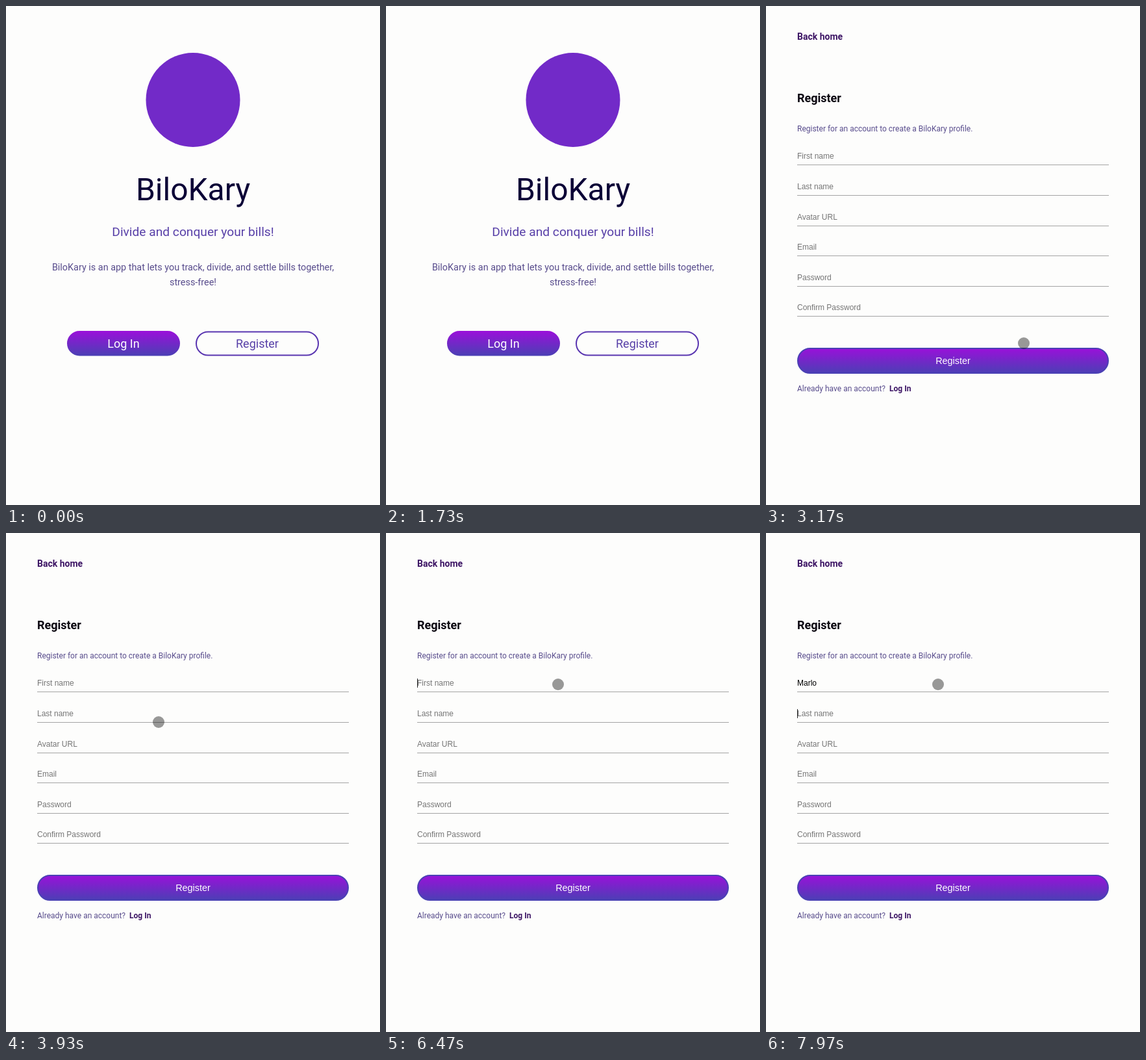
Write an HTML page with a canvas that moves like this. It is 576 px wide and 768 px high and loops after 8 s.

```html
<!DOCTYPE html>
<html lang="en">
<head>
<meta charset="utf-8">
<title>Bill splitting app</title>
<style>
  html, body { margin: 0; width: 100%; height: 100%; overflow: hidden; background: #fdfdfc; }
  canvas { display: block; width: 576px; height: 768px; }
</style>
</head>
<body>
<canvas id="stage"></canvas>
<script>
const W = 576, H = 768, LOOP = 8000;
const BRAND = 'BiloKary';
const FIRST_NAME = 'Marlo';
const ROBOTO = 'Roboto, sans-serif';
const ARIAL = '"Liberation Sans", Arial, sans-serif';
const FIELDS = ['First name', 'Last name', 'Avatar URL', 'Email', 'Password', 'Confirm Password'];

const color = {
  page: '#fdfdfc', title: '#0a0036', violet: '#5840a8', body: '#584c8c',
  link: '#3c1464', hint: '#757575', rule: '#a4a4a4', logo: '#722ac8',
  indigo: '#4a40b4', purple: '#9b10da', border: '#5834b0', pointer: '#999999'
};

const SWITCH = 2800, FOCUS = 5100, TYPE = 6730, KEY_GAP = 150, TAB = 7700;

// Pointer stops: time, x, y
const stops = [
  [1900, 500, 430], [2250, 397, 519], [3400, 397, 519], [3930, 235, 291],
  [4650, 103, 229], [5500, 103, 229], [6100, 265, 233], [LOOP, 265, 233]
];

const canvas = document.getElementById('stage');
const ctx = canvas.getContext('2d', { alpha: false });
const dpr = window.devicePixelRatio || 1;
canvas.width = W * dpr;
canvas.height = H * dpr;
ctx.scale(dpr, dpr);

function text(str, x, y, font, fill, align = 'left') {
  ctx.font = font;
  ctx.fillStyle = fill;
  ctx.textAlign = align;
  ctx.fillText(str, x, y);
}

function disc(x, y, r, fill) {
  ctx.fillStyle = fill;
  ctx.beginPath();
  ctx.arc(x, y, r, 0, Math.PI * 2);
  ctx.fill();
}

function pill(x, y, w, h, fill, stroke) {
  ctx.beginPath();
  ctx.roundRect(x + 1, y + 1, w - 2, h - 2, h / 2 - 1);
  if (fill) {
    ctx.fillStyle = fill;
    ctx.fill();
  }
  ctx.strokeStyle = stroke;
  ctx.lineWidth = 2;
  ctx.stroke();
}

function buttonFill(y, h) {
  const g = ctx.createLinearGradient(0, y, 0, y + h);
  g.addColorStop(0, color.purple);
  g.addColorStop(1, color.indigo);
  return g;
}

function drawHome() {
  const mid = W / 2;
  disc(mid, 144.5, 72.5, color.logo);
  text(BRAND, mid, 299, '48px ' + ROBOTO, color.title, 'center');
  text('Divide and conquer your bills!', mid, 354, '19.2px ' + ROBOTO, color.violet, 'center');
  const small = '14.4px ' + ROBOTO;
  text(BRAND + ' is an app that lets you track, divide, and settle bills together,',
    mid, 407, small, color.body, 'center');
  text('stress-free!', mid, 430, small, color.body, 'center');

  const fill = buttonFill(500, 38.5);
  pill(94, 500, 174, 38.5, fill, fill);
  text('Log In', 181, 526, '18px ' + ROBOTO, '#fff', 'center');
  pill(292, 500.5, 190, 38, null, color.border);
  text('Register', 387, 526, '18px ' + ROBOTO, color.violet, 'center');
}

function drawCaret(x, line) {
  ctx.fillStyle = '#222';
  ctx.fillRect(x, line - 20, 1, 14);
}

function blinkOn(since) {
  return since >= 0 && since % 1000 < 500;
}

function drawForm(t) {
  text('Back home', 48, 52, 'bold 14px ' + ROBOTO, color.link);
  text('Register', 48, 148, 'bold 18px ' + ROBOTO, '#0c0812');
  text('Register for an account to create a ' + BRAND + ' profile.', 48, 193, '12px ' + ROBOTO, color.body);

  const count = Math.max(0, Math.min(FIRST_NAME.length, Math.floor((t - TYPE) / KEY_GAP) + 1));
  const typed = FIRST_NAME.slice(0, count);
  const lastInput = count ? TYPE + (count - 1) * KEY_GAP : FOCUS;

  FIELDS.forEach((label, i) => {
    const line = Math.round(244.2 + 46.65 * i);
    ctx.fillStyle = color.rule;
    ctx.fillRect(48, line, 480, 1);
    const filled = i === 0 && count > 0;
    text(filled ? typed : label, 48, line - 9, '12px ' + ARIAL, filled ? '#000' : color.hint);

    if (i === 0 && t < TAB && blinkOn(t - lastInput)) {
      drawCaret(48 + Math.round(ctx.measureText(typed).width), line);
    }
    if (i === 1 && blinkOn(t - TAB)) drawCaret(48, line);
  });

  pill(48, 526, 480, 40, buttonFill(526, 40), color.indigo);
  text('Register', 288, 551, '14.4px ' + ARIAL, '#fff', 'center');
  text('Already have an account?', 48, 593, '12px ' + ROBOTO, color.body);
  text('Log In', 190, 593, 'bold 12px ' + ROBOTO, color.link);
}

function drawPointer(t) {
  const next = stops.findIndex(s => s[0] > t);
  if (next < 1) return;
  const [t0, x0, y0] = stops[next - 1];
  const [t1, x1, y1] = stops[next];
  const u = (t - t0) / (t1 - t0);
  const e = u * u * (3 - 2 * u);
  ctx.globalCompositeOperation = 'multiply';
  disc(x0 + (x1 - x0) * e, y0 + (y1 - y0) * e, 9, color.pointer);
  ctx.globalCompositeOperation = 'source-over';
}

function draw(t) {
  ctx.fillStyle = color.page;
  ctx.fillRect(0, 0, W, H);
  if (t < SWITCH) drawHome();
  else drawForm(t);
  drawPointer(t);
}

let start = null;
function tick() {
  const now = performance.now();
  if (start === null) start = now;
  draw((now - start) % LOOP);
  requestAnimationFrame(tick);
}
tick();
</script>
</body>
</html>
```
